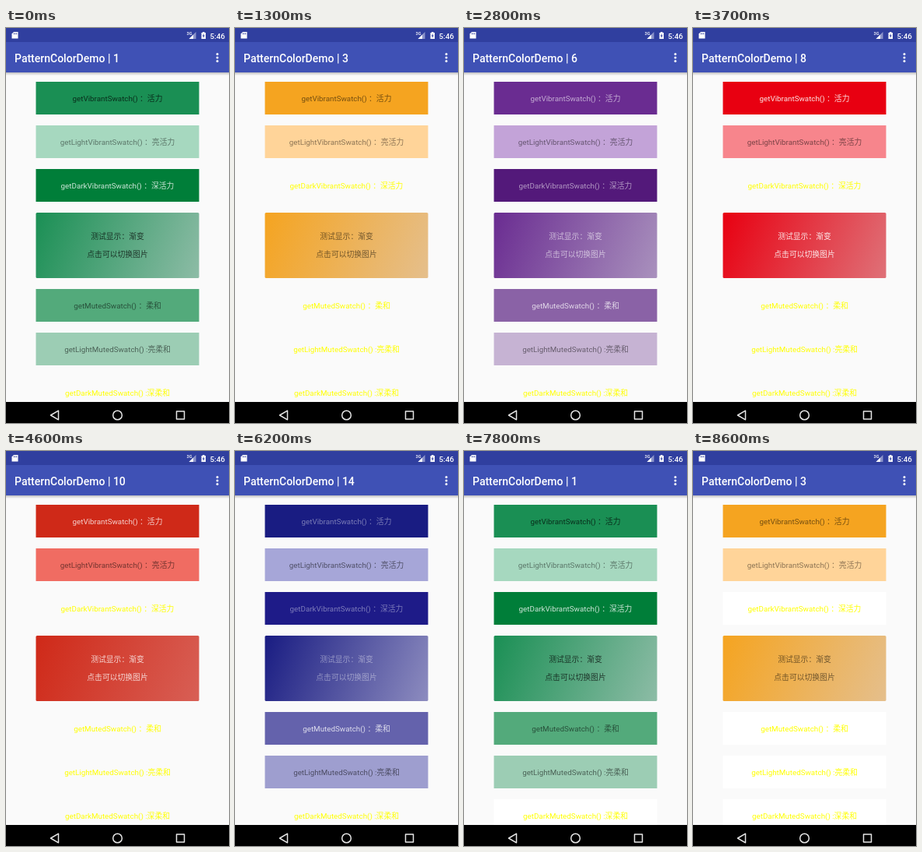
Write an HTML page with a canvas that moves like this. It is 287 px wide and 507 px high and loops after 9.4 s.

```html
<!DOCTYPE html>
<html lang="zh-CN">
<head>
<meta charset="utf-8">
<style>
html, body { margin: 0; width: 100%; height: 100%; overflow: hidden; background: #fafafa; }
canvas { display: block; }
</style>
</head>
<body>
<canvas id="stage" width="287" height="507"></canvas>
<script>
const ctx = document.getElementById('stage').getContext('2d');
const LOOP = 9400;
const CARD = { x: 38.5, w: 210, h: 42 };
const FAMILY = 'Roboto, "Noto Sans CJK SC", "Noto Sans CJK", sans-serif';
const LABELS = [
  [69, 'getVibrantSwatch() ：活力'],
  [125, 'getLightVibrantSwatch() ：亮活力'],
  [181, 'getDarkVibrantSwatch() ：深活力'],
  [335, 'getMutedSwatch() ：柔和'],
  [391, 'getLightMutedSwatch() :亮柔和'],
  [447, 'getDarkMutedSwatch() :深柔和']
];

// Each swatch is "fill ink": k = black, w = white, followed by opacity in percent.
// Rows follow LABELS; a missing swatch falls back to yellow on the page colour.
const PALETTES = {
  green: { end: '#8dbca6', rows: ['#1a8f54 k68', '#a6d8bf k45', '#007e39 w80', '#53aa7b k52', '#9ccdb4 k52'] },
  orange: { end: '#e5bf8c', rows: ['#f5a420 k52', '#ffd499 k45'] },
  blue: { end: '#8298c3', rows: ['#104b9f w52', '#94aad8 k48', '#00368a w58', '#507ab6 k70', '#dfe7ef k45'] },
  teal: { end: '#86b5bd', rows: ['#128a9c w70', '#93ced8 k48', '#006b7c w65', '#509faa k60', '#b9d9de k48'] },
  violet: { end: '#a991bd', rows: ['#6a2c91 w60', '#c3a3d8 k48', '#53197a w55', '#8a62a6 w75', '#c6b3d3 k48'] },
  rose: { end: '#d58ba8', rows: ['#cf2463 w75', '#ee93b4 k50', '#a31046 w65', '#b45f80 w80', '#dcb0c0 k48'] },
  red: { end: '#df7178', rows: ['#e80011 w88', '#f7858c k50'] },
  brick: { end: '#d85f55', rows: ['#cf2918 w78', '#f06c62 k52'] },
  coral: { end: '#e39a7c', rows: ['#e5532a w80', '#f7a58c k50'] },
  indigo: { end: '#8d8cbf', rows: ['#191c82 w42', '#a6a6d8 k52', '#1e1b88 w42', '#6462ac w78', '#9e9ecf k52'] }
};

const TIMELINE = [
  [0, 1, 'green'], [700, 2, 'orange'], [1300, 3, 'orange'], [2000, 4, 'blue'],
  [2400, 5, 'teal'], [2800, 6, 'violet'], [3300, 7, 'rose'], [3700, 8, 'red'],
  [4200, 9, 'rose'], [4600, 10, 'brick'], [5000, 11, 'coral'], [5400, 12, 'coral'],
  [5800, 13, 'violet'], [6200, 14, 'indigo'], [6600, 15, 'blue'], [7000, 16, 'teal'],
  [7400, 17, 'teal'], [7800, 1, 'green'], [8200, 1, 'orange'], [8600, 3, 'orange']
];
const WHITE_CARDS_FROM = 7400;

function rect(x, y, w, h, fill) {
  ctx.fillStyle = fill;
  ctx.fillRect(x, y, w, h);
}

function dot(x, y, r, fill) {
  ctx.fillStyle = fill;
  ctx.beginPath();
  ctx.arc(x, y, r, 0, Math.PI * 2);
  ctx.fill();
}

function polygon(points, fill) {
  ctx.beginPath();
  points.forEach(([x, y]) => ctx.lineTo(x, y));
  ctx.closePath();
  if (fill) {
    ctx.fillStyle = fill;
    ctx.fill();
  }
}

function text(str, x, y, font, fill, align = 'left') {
  ctx.font = `${font} ${FAMILY}`;
  ctx.textAlign = align;
  ctx.fillStyle = fill;
  ctx.fillText(str, x, y);
}

function label(str, baseline, fill) {
  text(str, 143.5, baseline, '9.8px', fill, 'center');
}

function swatch(spec) {
  const [fill, ink] = spec.split(' ');
  const level = ink[0] === 'w' ? 255 : 0;
  return { fill, ink: `rgba(${level},${level},${level},${ink.slice(1) / 100})` };
}

function drawStatusBar() {
  rect(0, 0, 287, 18, '#303f9f');
  polygon([[10, 5], [15.5, 5], [15.5, 13.5], [7.5, 13.5], [7.5, 7.5]], '#fff');
  [9.7, 11.5, 13.3].forEach(x => rect(x, 6.3, 0.8, 2, '#303f9f'));
  text('3G', 232.5, 9, '500 5.5px', '#fff');
  polygon([[244.5, 5], [244.5, 14], [235.5, 14]], 'rgba(255,255,255,.45)');
  polygon([[241, 8.5], [241, 14], [235.5, 14]], '#fff');
  rect(251.5, 6, 5.5, 8, '#fff');
  rect(253, 5, 2.5, 1, '#fff');
  polygon([[254.8, 7], [252.7, 10.5], [254, 10.5], [253.7, 13], [255.8, 9.5], [254.5, 9.5]], '#303f9f');
  text('5:46', 262.5, 13.6, '500 9.8px', '#fff');
}

function drawToolbar(count) {
  const shadow = ctx.createLinearGradient(0, 57, 0, 61);
  shadow.addColorStop(0, 'rgba(0,0,0,.24)');
  shadow.addColorStop(1, 'rgba(0,0,0,0)');
  rect(0, 57, 287, 4, shadow);
  rect(0, 18, 287, 39, '#3f51b5');
  text(`PatternColorDemo | ${count}`, 11, 43.5, '500 14px', '#fff');
  [33.5, 38, 42.5].forEach(y => dot(272, y, 1.5, '#fff'));
}

function drawGradientCard({ end, rows }) {
  const { fill, ink } = swatch(rows[0]);
  const { x, w } = CARD;
  const gradient = ctx.createLinearGradient(x, 237, x + w, 321);
  gradient.addColorStop(0, fill);
  gradient.addColorStop(1, end);
  ctx.fillStyle = gradient;
  ctx.beginPath();
  ctx.roundRect(x, 237, w, 84, 1.6);
  ctx.fill();
  label('测试显示：渐变', 271.2, ink);
  label('点击可以切换图片', 294.2, ink);
}

function drawCards(palette, emptyFill) {
  LABELS.forEach(([y, str], i) => {
    const spec = palette.rows[i];
    const { fill, ink } = spec ? swatch(spec) : { fill: emptyFill, ink: '#ffff00' };
    rect(CARD.x, y, CARD.w, CARD.h, fill);
    label(str, y + 24.5, ink);
  });
  drawGradientCard(palette);
}

function drawNavBar() {
  rect(0, 480, 287, 27, '#000');
  ctx.strokeStyle = '#e6e6e6';
  ctx.lineWidth = 1.5;
  ctx.lineJoin = 'round';
  polygon([[57.5, 497], [67.5, 491.2], [67.5, 502.8]]);
  ctx.stroke();
  ctx.beginPath();
  ctx.arc(143.5, 497, 5.8, 0, Math.PI * 2);
  ctx.stroke();
  ctx.strokeRect(219.5, 492, 10, 10);
}

function draw(time) {
  const [, count, name] = TIMELINE.filter(([start]) => start <= time).pop();
  rect(0, 0, 287, 507, '#fafafa');
  drawCards(PALETTES[name], time >= WHITE_CARDS_FROM ? '#fff' : '#fafafa');
  drawStatusBar();
  drawToolbar(count);
  drawNavBar();
}

const startTime = performance.now();
function tick() {
  draw((performance.now() - startTime) % LOOP);
  requestAnimationFrame(tick);
}
tick();
</script>
</body>
</html>
```
